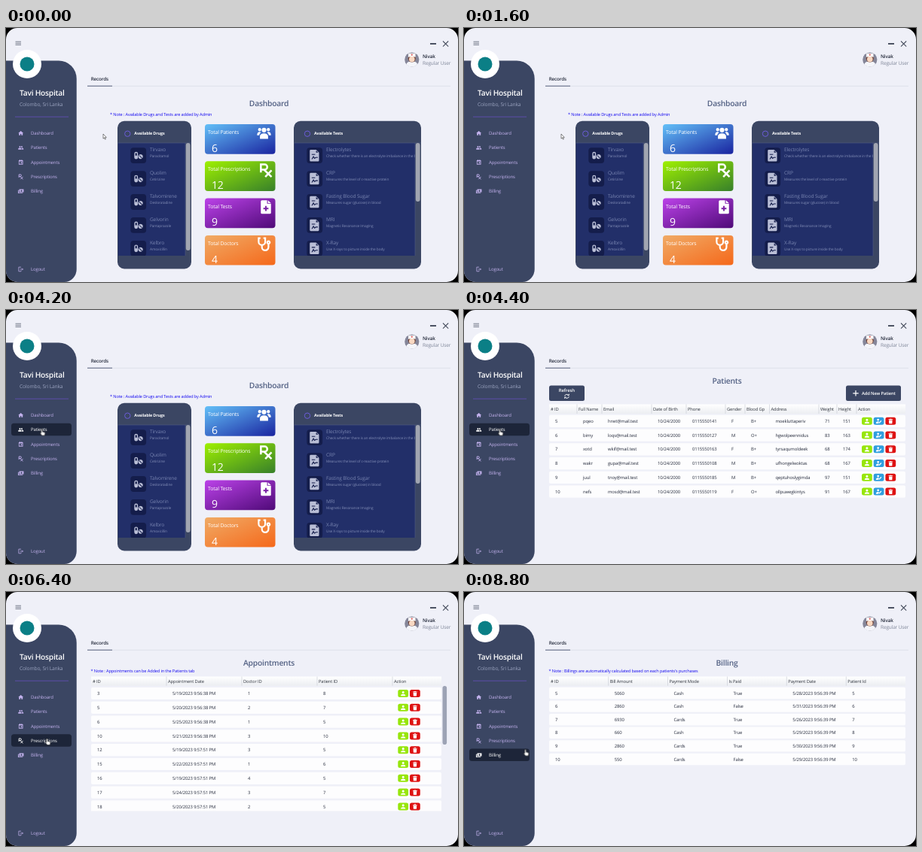
These frames come from a looping animation (600x338 px, 9000 ms). An HTML page:

```html
<!DOCTYPE html>
<html lang="en">
<head>
<meta charset="utf-8">
<title>Hospital dashboard</title>
<style>
html, body { margin: 0; width: 100%; height: 100%; overflow: hidden; background: #000; }
svg { display: block; width: 600px; height: 338px; font-family: "Open Sans", "Noto Sans", sans-serif; }
text { letter-spacing: -.022em; text-rendering: geometricPrecision; }
.b { font-weight: 600; }
.anim { animation: 9s step-end infinite; }
#dash { animation-name: dash; }
#patients { animation-name: patients; }
#visits { animation-name: visits; }
#billing { animation-name: billing; }
#hover0 { animation-name: hover0; }
#hover1 { animation-name: hover1; }
#hover2 { animation-name: hover2; }
#hover3 { animation-name: hover3; }
#hover4 { animation-name: hover4; }
#arrow { animation-name: arrow; }
#hand { animation-name: hand; }
#cursor { animation-name: move; }
@keyframes dash { 0% { visibility: visible } 48.88%, 100% { visibility: hidden } }
@keyframes patients { 0% { visibility: hidden } 48.88% { visibility: visible } 62.22%, 100% { visibility: hidden } }
@keyframes visits { 0% { visibility: hidden } 62.22% { visibility: visible } 82.22%, 100% { visibility: hidden } }
@keyframes billing { 0% { visibility: hidden } 82.22%, 100% { visibility: visible } }
@keyframes hover0 { 0% { visibility: hidden } 28.88% { visibility: visible } 42.22%, 100% { visibility: hidden } }
@keyframes hover1 { 0% { visibility: hidden } 42.22% { visibility: visible } 57.77%, 100% { visibility: hidden } }
@keyframes hover2 { 0% { visibility: hidden } 57.77% { visibility: visible } 68.88%, 100% { visibility: hidden } }
@keyframes hover3 { 0% { visibility: hidden } 68.88% { visibility: visible } 77.77%, 100% { visibility: hidden } }
@keyframes hover4 { 0% { visibility: hidden } 77.77%, 100% { visibility: visible } }
@keyframes arrow { 0% { visibility: visible } 28.88%, 100% { visibility: hidden } }
@keyframes hand { 0% { visibility: hidden } 28.88%, 100% { visibility: visible } }
@keyframes move {
  0% { transform: translate(129px, 141px) }
  26.66% { transform: translate(106px, 140px) }
  28.88% { transform: translate(66px, 138px) }
  31.11% { transform: translate(58px, 138px) }
  39.99% { transform: translate(54px, 144px) }
  42.22% { transform: translate(48px, 156px) }
  44.44% { transform: translate(47.5px, 158.5px) }
  55.55% { transform: translate(48px, 162px) }
  57.77% { transform: translate(50px, 174px) }
  59.99% { transform: translate(51px, 177px) }
  66.66% { transform: translate(53px, 184px) }
  68.88% { transform: translate(54.5px, 195px) }
  75.55% { transform: translate(54px, 200px) }
  77.77% { transform: translate(54px, 212px) }
  79.99% { transform: translate(55px, 214px) }
  93.33% { transform: translate(64px, 213px) }
  95.55% { transform: translate(75px, 211px) }
  97.77%, 100% { transform: translate(81.5px, 209.5px) }
}
</style>
</head>
<body>
<svg id="stage" viewBox="0 0 600 338"></svg>
<script>
const SLATE = '#3b4663', INK = '#252b3c', LILAC = '#c3b2ee';

// Icons live on a 24-unit grid.
const solid = {
  home: 'M10 21v-6h4v6h6v-9h3L12 2 1 12h3v9z',
  people: 'M16 11a3 3 0 1 0 0-6 3 3 0 0 0 0 6zM8 11a3.2 3.2 0 1 0 0-6.4A3.2 3.2 0 0 0 8 11zM8 13c-2.3 0-7 1.2-7 3.5V20h14v-3.5C15 14.2 10.3 13 8 13zM16 13l-1 .1c1.2.8 2 2 2 3.4V20h6v-3.5c0-2.3-4.7-3.5-7-3.5z',
  calendar: 'M3 4h18v18H3zM5.5 9v10.5h13V9zM12 12h5v5h-5zM7 1h2.5v3H7zM14.5 1H17v3h-2.5z',
  money: 'M5 4h19v13H5zM14.5 7a3.5 3.5 0 1 0 .01 0zM0 8h3v11h17v2.5H0z',
  pills: 'M6.5 3A4.5 4.5 0 0 1 11 7.5v9a4.5 4.5 0 0 1-9 0v-9A4.5 4.5 0 0 1 6.5 3zM4.5 7.5V12h4V7.5a2 2 0 0 0-4 0zM17.5 9a5.7 5.7 0 1 0 .01 0zM13.5 12.3l7 7 1.2-1.2-7-7z',
  report: 'M4 0h11l6 6v16a2 2 0 0 1-2 2H4a2 2 0 0 1-2-2V2a2 2 0 0 1 2-2zM15 1.5V6h4.5zM6 9h7v1.6H6zM5.500 19.500l4-7 2.500 4 2.500-1.500h4v1.700h-3.500L11.500 19 9.500 16 7.500 19.500z',
  addFile: 'M3 2a2 2 0 0 1 2-2h9v6h7v16a2 2 0 0 1-2 2H5a2 2 0 0 1-2-2zM15.5 0 21 5h-5.5zM10.7 10v3.2H7.5v2.6h3.2V19h2.6v-3.2h3.2v-2.6h-3.2V10z',
  crowd: 'M12 11a4 4 0 1 0 0-8 4 4 0 0 0 0 8zM5 22v-4c0-7 14-7 14 0v4zM4.5 9a2.8 2.8 0 1 0 0-5.6 2.8 2.8 0 0 0 0 5.6zM19.5 9a2.8 2.8 0 1 0 0-5.6 2.8 2.8 0 0 0 0 5.6zM0 16c0-6 4-7 7-5-2 1-3 3-3.3 5zM24 16c0-6-4-7-7-5 2 1 3 3 3.3 5z',
  person: 'M12 12a5 5 0 1 0 0-10 5 5 0 0 0 0 10zM2 22c0-10 20-10 20 0z',
  edit: 'M9 11a4.5 4.5 0 1 0 0-9 4.5 4.5 0 0 0 0 9zM0 22c0-9 8-10 13-8l-3 8zM12 22l1-4 8-9 3 3-8 9z',
  trash: 'M3 4h5l1-2h6l1 2h5v2.5H3zM4.5 8h15l-1 15h-13z'
};
const outline = {
  rx: [3, 'M4 16V3h6a4.2 4.2 0 0 1 0 8.4H4M9 11.4 21 23M21 12.5 11 23'],
  exit: [2.4, 'M13 3H3v18h10v-4M9 12h12M17 8l4 4-4 4'],
  steth: [2.8, 'M6 2H3v6a5.5 5.5 0 0 0 11 0V2h-3M8.5 14v3a5.5 5.5 0 0 0 11 0v-5M19.5 7a2.2 2.2 0 1 0 .01 0'],
  sync: [3, 'M3 11a9 8 0 0 1 16-4M21 2v6h-6M21 13a9 8 0 0 1-16 4M3 22v-6h6']
};

const rect = (x, y, w, h, fill, r = 0) =>
  `<rect x="${x}" y="${y}" width="${w}" height="${h}" rx="${r}" fill="${fill}"/>`;
const text = (x, y, size, fill, s, more = '') =>
  `<text x="${x}" y="${y}" font-size="${size}" fill="${fill}" ${more}>${s}</text>`;
const bold = (x, y, size, fill, s, more = '') => text(x, y, size, fill, s, 'class="b" ' + more);
const line = (d, color, w) => `<path d="${d}" fill="none" stroke="${color}" stroke-width="${w}"/>`;
const circle = (x, y, r, fill) => `<circle cx="${x}" cy="${y}" r="${r}" fill="${fill}"/>`;
const group = (id, body) => `<g id="${id}" class="anim">${body}</g>`;

// Draws an icon centred on x, y.
function icon(name, x, y, size, color) {
  const shape = solid[name]
    ? `<path d="${solid[name]}" fill="${color}" fill-rule="evenodd"/>`
    : line(outline[name][1], color, outline[name][0]);
  return `<g transform="translate(${x - size / 2} ${y - size / 2}) scale(${size / 24})">${shape}</g>`;
}

const heading = (y, s) => bold(349, y, 10.3, '#526083', s, 'text-anchor="middle"');
const note = (x, y, s) => text(x, y, 5.6, '#1408f0', '* Note : ' + s);

function sidebar() {
  const items = [['home', 'Dashboard'], ['people', 'Patients'], ['calendar', 'Appointments'],
    ['rx', 'Prescriptions'], ['money', 'Billing']];
  const entry = (name, label, y, color) =>
    icon(name, 19.7, y, 7.5, color) + text(33, y + 2.1, 6, color, label);
  return `<path d="M0 43.5H70a23.700 24 0 0 1 23.700 24V321a16 17 0 0 1-16 17H0z" fill="${SLATE}"/>` +
    circle(28, 48, 19, '#fff') + circle(28, 48, 9.5, '#0b7f86') +
    bold(18, 90, 10.2, '#fff', 'Tavi Hospital') +
    text(18, 104.4, 6.7, '#9aa3bf', 'Colombo, Sri Lanka') +
    line('M12 118.2H83', '#6a4fc6', .7) +
    items.map(([name, label], i) => {
      const y = 140 + i * 19.25;
      return entry(name, label, y, LILAC) +
        group('hover' + i, rect(7, y - 8.5, 80, 16.6, '#1d2539', 3.5) + entry(name, label, y, '#fff'));
    }).join('') +
    entry('exit', 'Logout', 321, LILAC);
}

function topBar() {
  return line('M12.5 18.2H20M12.5 20.3H20M12.5 22.4H20', '#596070', .8) +
    line('M563 21H571', '#4b5263', 1.8) +
    line('M580 17.5l7.2 7.2M587.2 17.5l-7.2 7.2', '#4b5263', 1.1) +
    circle(538.8, 42, 9.6, '#858699') +
    '<path d="M531.5 48.2q1-4 7.3-4t7.3 4a9.6 9.6 0 0 1-14.6 0z" fill="#f4f5fa"/>' +
    circle(538.8, 40.6, 5, '#6d4038') + circle(538.8, 41.5, 3.8, '#f8d8c2') +
    '<path d="M534 38.800l.2-5h9.200l.2 5q-4.800-1.800-9.600 0z" fill="#fff"/>' +
    line('M538.8 34.4v2.6M537.5 35.7H540.1', '#d84a4a', .8) +
    bold(553, 39.8, 6.4, INK, 'Nivak') +
    text(553, 48.7, 6.5, '#7f8699', 'Regular User') +
    bold(112.7, 69.8, 6.3, INK, 'Records') +
    line('M108 77.3H590', '#d9dce6', .7) + line('M108 77.2H141', '#4a5470', .9);
}

function listPanel({ x, w, title, titleX, name, size, rows, thumb }) {
  const inner = w - 8, clip = 'clip-' + name, left = x + 17.3;
  return rect(x, 123.8, w, 196.6, SLATE, 9) +
    `<clipPath id="${clip}">${rect(x, 153, inner, 150, '#000')}</clipPath>` +
    rect(x + 1, 153, inner - 1, 150, '#222f69') +
    line(`M${x} 153H${x + w}M${x + inner} 153V303`, '#56618a', .5) +
    rect(x + w - 7.2, 153, 5.8, thumb, '#a1a5b1', 2.9) +
    `<circle cx="${titleX - 9}" cy="140.7" r="3.7" fill="none" stroke="#6b5cd8"/>` +
    text(titleX, 142.2, 5.4, '#fff', title, 'font-weight="700"') +
    `<g clip-path="url(#${clip})">` + rows.map(([top, sub], i) => {
      const y = 169.7 + i * 30.9;
      return rect(left, y - 10.4, 20.8, 20.8, '#141d4b', 4) +
        icon(name, left + 10.4, y, size, '#b9bed6') +
        text(left + 25.7, y - 5.4, 6.55, '#7884b0', top) +
        text(left + 25.7, y + 2.5, 4.8, '#828db6', sub);
    }).join('') + '</g>';
}

function card(i, label, value, name, iconX, size, from, to) {
  const y = 128 + i * 49.3;
  return `<linearGradient id="tint${i}" x2="1" y2="1"><stop stop-color="${from}"/><stop offset="1" stop-color="${to}"/></linearGradient>` +
    rect(264, y, 93.5, 39.7, `url(#tint${i})`, 4) +
    text(268, y + 12.9, 6.9, '#fff', label) +
    text(273, y + 36.7, 14, '#fff', value) +
    icon(name, iconX, y + 11.7, size, '#fff');
}

function dashboard() {
  return heading(103.9, 'Dashboard') +
    note(138, 117, 'Available Drugs and Tests are added by Admin') +
    listPanel({
      x: 148, w: 98, title: 'Available Drugs', titleX: 170.3, name: 'pills', size: 13, thumb: 143,
      rows: [['Tirvaxo', 'Paracitamol'], ['Quolim', 'Cetirizine'], ['Talvomirene', 'Desloratadine'],
        ['Gelvorin', 'Pantaprazole'], ['Kelbro', 'Amoxicillin']]
    }) +
    card(0, 'Total Patients', 6, 'crowd', 342.5, 18.5, '#63c0f8', '#1a24a0') +
    card(1, 'Total Prescriptions', 12, 'rx', 345, 20, '#9ef000', '#37802a') +
    card(2, 'Total Tests', 9, 'addFile', 345, 18, '#bb42e8', '#4f0a78') +
    card(3, 'Total Doctors', 4, 'steth', 342.5, 19, '#f0ab66', '#f5681a') +
    listPanel({
      x: 382, w: 169, title: 'Available Tests', titleX: 409, name: 'report', size: 15.5, thumb: 78,
      rows: [['Electrolytes', 'Check whether there is an electrolyte imbalance in the body'],
        ['CRP', 'Measures the level of c-reactive protein'],
        ['Fasting Blood Sugar', 'Measures sugar (glucose) in blood'],
        ['MRI', 'Magnetic Resonance Imaging'],
        ['X-Ray', 'Use X-rays to picture inside the body']]
    });
}

const actions = { person: '#97e60c', edit: '#2f9ede', trash: '#de1212' };
const button = (name, x, y) =>
  rect(x, y - 5, 13.8, 10, actions[name], 2.5) + icon(name, x + 6.9, y, 7.5, '#fff');

// cols: [text x, title]; cells sit 6px further right than their title.
function table({ top, height, right, cols, rows, first, pitch, rowHeight, buttons = [], buttonX }) {
  let s = rect(113, top, right - 113, height, 'url(#head)');
  cols.forEach(([x, title], i) => {
    if (i) s += line(`M${x - 2} ${top}v${height}`, '#c6cad4', .6);
    s += text(x, top + height / 2 + 2, 5.8, '#30353f', title);
  });
  rows.forEach((row, r) => {
    const y = first + r * pitch;
    s += rect(113, y - rowHeight / 2, right - 113, rowHeight, '#fdfdfe', 2);
    row.forEach((cell, i) => { s += text(cols[i][0] + 6, y + 2.1, 5.9, INK, cell); });
    buttons.forEach((name, i) => { s += button(name, buttonX + i * 15.7, y); });
  });
  return s;
}

function patientsPage() {
  const rows = [
    [5, 'pqeo', 'hrwt', '0115550141', 'F', 'B+', 'moekluttaperiv', 71, 151],
    [6, 'bimy', 'loqs', '0115550127', 'M', 'O+', 'hgwolpeennidus', 83, 163],
    [7, 'xotd', 'wkif', '0115550163', 'F', 'B+', 'tyrsaqumoldeek', 68, 174],
    [8, 'wakr', 'gupa', '0115550108', 'M', 'B+', 'ufhongelwoktas', 68, 167],
    [9, 'juul', 'tnoy', '0115550185', 'M', 'B+', 'qeptuhoslygimda', 97, 151],
    [10, 'nefs', 'mosd', '0115550119', 'F', 'O+', 'ollpuwegkintys', 91, 167]
  ].map(([id, name, mail, phone, ...rest]) => [id, name, mail + '@mail.test', '10/24/2000', phone, ...rest]);
  return heading(98.1, 'Patients') +
    rect(113, 100.6, 47, 20.4, SLATE, 2.5) +
    bold(136.4, 109.4, 6, '#fff', 'Refresh', 'text-anchor="middle"') +
    icon('sync', 136.5, 114.8, 7.5, '#fff') +
    rect(507, 100.6, 73, 20.4, SLATE, 2.5) +
    line('M516.3 110.8h7.4M520 107.1v7.4', '#fff', 1.2) +
    bold(528, 113, 5.8, '#fff', 'Add New Patient') +
    table({
      top: 125.5, height: 12.5, right: 586, rows, first: 147.8, pitch: 18.75, rowHeight: 16.2,
      cols: [[115, '# ID'], [152, 'Full Name'], [185, 'Email'], [251, 'Date of Birth'], [297, 'Phone'],
        [349, 'Gender'], [375, 'Blood Gp'], [407.5, 'Address'], [473, 'Weight'], [497, 'Height'], [523, 'Action']],
      buttons: ['person', 'edit', 'trash'], buttonX: 528
    });
}

function visitsPage() {
  const rows = [
    [3, '19', 1, 8], [5, '20', 2, 7], [6, '25', 1, 5], [10, '21', 3, 10], [12, '19', 3, 5],
    [15, '22', 1, 6], [16, '19', 4, 5], [17, '24', 3, 7], [18, '20', 2, 5]
  ].map(([id, day, doctor, patient], i) =>
    [id, `5/${day}/2023 ${i < 4 ? '9:56:38' : '9:57:51'} PM`, doctor, patient]);
  return heading(98.1, 'Appointments') +
    note(112.5, 106.5, 'Appointments can be Added in the Patients tab') +
    '<clipPath id="fold"><path d="M108 110h482v181.5H108z"/></clipPath><g clip-path="url(#fold)">' +
    table({
      top: 112.5, height: 12.2, right: 578, rows, first: 135, pitch: 18.8, rowHeight: 16.2,
      cols: [[115, '# ID'], [215, 'Appointment Date'], [315, 'Doctor ID'], [415, 'Patient ID'], [515, 'Action']],
      buttons: ['person', 'trash'], buttonX: 520.3
    }) + '</g>' + rect(579.5, 125, 5.6, 78, '#9da3b5', 2.8);
}

function billingPage() {
  const rows = [
    [5, 5060, 'Cash', 'True', '28'], [6, 2860, 'Cash', 'False', '31'], [7, 6930, 'Cards', 'True', '26'],
    [8, 660, 'Cash', 'True', '29'], [9, 2860, 'Cards', 'True', '30'], [10, 550, 'Cards', 'False', '29']
  ].map(([id, sum, mode, paid, day]) => [id, sum, mode, paid, `5/${day}/2023 9:56:39 PM`, id]);
  return heading(98.1, 'Billing') +
    note(112.5, 106.5, 'Billings are automatically calculated based on each patients\'s purchases') +
    table({
      top: 112.5, height: 12.2, right: 586, rows, first: 134.5, pitch: 17.6, rowHeight: 15.4,
      cols: [[115, '# ID'], [193.7, 'Bill Amount'], [272.5, 'Payment Mode'], [351.5, 'Is Paid'],
        [430.3, 'Payment Date'], [509.3, 'Patient Id']]
    });
}

const pointer = (id, d, w) =>
  group(id, `<path d="${d}" fill="#fff" stroke="#111" stroke-width="${w}" stroke-linejoin="round"/>`);

document.getElementById('stage').innerHTML =
  '<defs><linearGradient id="head" x2="0" y2="1"><stop stop-color="#fff"/><stop offset="1" stop-color="#eceef2"/></linearGradient>' +
  `<clipPath id="window">${rect(0, 0, 600, 338, '#000', 15)}</clipPath></defs>` +
  '<g clip-path="url(#window)">' + rect(0, 0, 600, 338, '#eff0f8') +
  sidebar() + topBar() +
  group('dash', dashboard()) + group('patients', patientsPage()) +
  group('visits', visitsPage()) + group('billing', billingPage()) + '</g>' +
  group('cursor',
    pointer('arrow', 'M0 0v6.2l1.4-1.3 1 2.3 1-.4-1-2.2h1.9z', .5) +
    pointer('hand', 'M-.9 .8a.9.9 0 0 1 1.8 0V3.6l2.6.6q1 .3.9 1.4L3.8 8.6H.2L-2.2 5.5q.2-1.1 1.3-.2z', .55));
</script>
</body>
</html>
```
